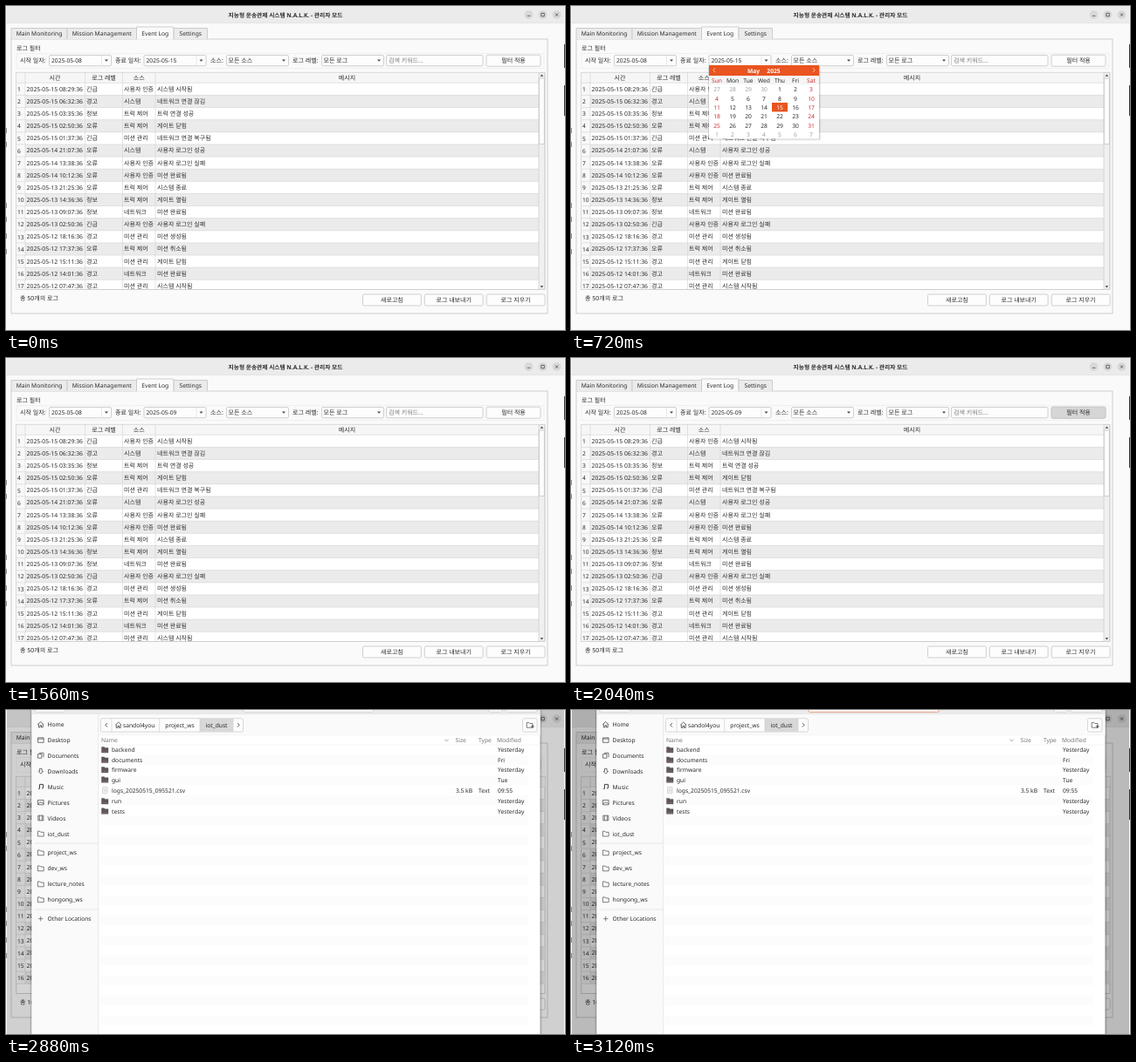
These frames come from a looping animation (640x372 px, 3240 ms). An HTML page:

```html
<!DOCTYPE html>
<html lang="ko">
<head>
<meta charset="utf-8">
<title>Event log</title>
<style>
html, body { margin: 0; width: 100%; height: 100%; overflow: hidden; background: #fafafa; }
svg { display: block; width: 640px; height: 372px; }
text { font-family: "Noto Sans", "Noto Sans CJK KR", "Noto Sans CJK JP", "Noto Sans CJK", sans-serif; text-rendering: geometricPrecision; white-space: pre; }
</style>
</head>
<body>
<svg id="stage" viewBox="0 0 640 372" xmlns="http://www.w3.org/2000/svg"></svg>
<script>
const LOOP = 3240;
const INK = '#2b2b2b', EDGE = '#c4c4c4', ORANGE = '#e95420', RED = '#cf2f35';
const KO = 7, EN = 6.7;

// y is the vertical middle of the text
const text = (x, y, s, o = {}) => {
  const size = o.size || (/[가-힣]/.test(s) ? KO : EN);
  return `<text x="${x}" y="${y + 2.5}" font-size="${size}" fill="${o.fill || INK}"` +
    ` text-anchor="${o.anchor || 'start'}" font-weight="${o.weight || 400}">${s}</text>`;
};
const mid = (x, y, s, o = {}) => text(x, y, s, { ...o, anchor: 'middle' });
const box = (x, y, w, h, fill, stroke = 'none', r = 0, extra = '') =>
  `<rect x="${x}" y="${y}" width="${w}" height="${h}" fill="${fill}" stroke="${stroke}" stroke-width=".8" rx="${r}" ${extra}/>`;
const path = (d, stroke = '#555', w = .8, fill = 'none') =>
  `<path d="${d}" fill="${fill}" stroke="${stroke}" stroke-width="${w}"/>`;
const group = (id, body) => `<g id="${id}">${body}</g>`;
const button = (x, y, w, label, fill = '#fdfdfd') =>
  box(x, y, w, 13, fill, EDGE, 1.5) + mid(x + w / 2, y + 6.6, label);
const down = (x, y) => path(`M${x - 2} ${y - 1}h4l-2 2.4z`, 'none', 0, '#444');

function windowFrame() {
  let s = box(0, 0, 640, 372, '#fafafa') + box(1, 0, 638, 19.5, '#ebebeb') + path('M1 19.5H639', '#dedede', .6);
  s += mid(320, 10.2, '지능형 운송관제 시스템 N.A.L.K. - 관리자 모드', { size: 6.7, weight: 600 });
  for (const x of [598.5, 614.5, 630.5]) s += `<circle cx="${x}" cy="10" r="5" fill="#d9d9d9"/>`;
  s += path('M596.8 11.3h3.6M612.8 8.3h3.5v3.5h-3.5zM628.9 8.4l3.3 3.3M632.2 8.4l-3.3 3.3', '#333', .7);
  for (const y of [140, 156, 226, 242, 261, 279]) s += box(0, y, .8, 6, '#777');
  for (const [y, h] of [[44, 27], [91, 35]]) s += box(639, y, 1, h, '#333');
  s += box(6, 38, 614, 315, '#fafafa', EDGE);
  const tabs = [[6, 64, 'Main Monitoring'], [70, 79.5, 'Mission Management'], [149.5, 42.5, 'Event Log'], [192, 38.5, 'Settings']];
  for (const [x, w, name] of tabs) {
    const on = name === 'Event Log';
    s += path(`M${x} 38V${on ? 24 : 25.5}h${w}V38`, EDGE, .8, on ? '#fafafa' : '#ebebeb');
    if (on) s += path(`M${x + .4} 38h${w - .8}`, '#fafafa', 1.2);
    s += mid(x + w / 2, 31, name);
  }
  return s;
}

function filterBar() {
  let s = text(12, 48.2, '로그 필터') + box(12, 54.5, 604, 17, 'none', '#eeeeee');
  const labels = [[16, '시작 일자:'], [125, '종료 일자:'], [234, '소스:'], [328, '로그 레벨:']];
  for (const [x, label] of labels) s += text(x, 62.2, label);
  for (const x of [49.5, 158, 252.5, 361.5]) s += box(x, 56.5, 71, 12.3, '#fdfdfd', EDGE, 1.5) + down(x + 65.5, 62.4);
  for (const x of [109.5, 218]) s += path(`M${x} 57v11.5`, '#dcdcdc', .6);
  s += text(52, 62.7, '2025-05-08') + text(254.5, 62.7, '모든 소스') + text(363.5, 62.7, '모든 로그');
  s += box(435.5, 56.5, 110.5, 12.3, '#fdfdfd', EDGE, 1.5) + text(438, 62.7, '검색 키워드...', { fill: '#777' });
  s += group('endDate', '') + group('caret', path('M160.3 58.5v8.5', '#222', .7));
  s += button(550, 56.2, 62, '필터 적용') + group('pressed', button(550, 56.2, 62, '필터 적용', '#d6d6d6'));
  return s;
}

const LEVELS = ['긴급', '경고', '정보', '오류'];
const SOURCES = ['사용자 인증', '시스템', '트럭 제어', '미션 관리', '네트워크'];
// day, time, level, source, message
const ALL = `15 08:29 0 0 시스템 시작됨
15 06:32 1 1 네트워크 연결 끊김
15 03:35 2 2 트럭 연결 성공
15 02:50 3 2 게이트 닫힘
15 01:37 0 3 네트워크 연결 복구됨
14 21:07 3 1 사용자 로그인 성공
14 13:38 3 0 사용자 로그인 실패
14 10:12 3 0 미션 완료됨
13 21:25 3 2 시스템 종료
13 14:36 2 2 게이트 열림
13 09:07 2 4 미션 완료됨
13 02:50 0 0 사용자 로그인 실패
12 18:16 1 3 미션 생성됨
12 17:37 3 2 미션 취소됨
12 15:11 1 3 게이트 닫힘
12 14:01 1 4 미션 완료됨
12 07:47 1 3 시스템 시작됨`;
const FILTERED = `09 12:13 0 4 미션 완료됨
09 10:57 1 2 사용자 로그인 실패
09 06:19 1 0 네트워크 연결 끊김
09 05:22 0 2 시스템 시작됨
09 04:53 3 1 미션 완료됨
09 04:29 2 3 사용자 로그인 성공
08 22:51 0 4 미션 완료됨
08 22:35 1 1 미션 생성됨
08 18:51 1 1 배터리 부족 경고
08 17:01 2 4 네트워크 연결 끊김
08 15:37 2 0 시스템 종료
08 15:19 1 3 게이트 열림
08 12:38 1 2 네트워크 연결 끊김
08 11:02 3 4 트럭 연결 성공
08 10:42 3 3 시스템 시작됨
08 10:10 3 1 미션 생성됨`;

function table(data, total, scrolls) {
  const right = scrolls ? 610 : 617, top = 88.3, step = 14.125;
  const rows = data.split('\n');
  const end = Math.min(325.5, top + rows.length * step);
  let s = box(11.8, 76.3, 605.2, 249.2, '#fff', EDGE) + box(12.2, 76.7, right - 12.2, 11.6, '#f6f6f6');
  let body = '', lines = `M12 ${top}H${right}`;
  rows.forEach((row, i) => {
    const [day, time, level, source, ...message] = row.split(' ');
    const y = top + i * step, c = y + 7;
    if (i % 2) body += box(22, y, right - 22, step, '#ebebeb');
    body += box(12.2, y, 9.8, step, '#f8f8f8');
    lines += `M12 ${y + step}H${right}`;
    body += text(13, c + .3, i + 1) + text(23.6, c, `2025-05-${day} ${time}:36`, { size: 6.82 });
    body += text(92, c, LEVELS[level]) + text(135, c, SOURCES[source]) + text(173, c, message.join(' '));
  });
  for (const x of [22, 90.5, 133.5, 171]) lines += `M${x} 76.5V${end}`;
  s += `<g clip-path="url(#tableClip)">${body}${path(lines, '#d2d2d2', .6)}</g>`;
  [[56, '시간'], [112, '로그 레벨'], [152.3, '소스'], [(171 + right) / 2, '메시지']]
    .forEach(([x, name]) => s += mid(x, 82.7, name));
  if (scrolls) {
    s += box(610, 76.7, 6.6, 248.4, '#f0f0f0', '#d0d0d0') + box(610.3, 83, 6, 75.5, '#fcfcfc', EDGE);
    s += path('M611.6 80.8h3.6l-1.8-2.2zM611.6 321.2h3.6l-1.8 2.2z', 'none', 0, '#444');
  }
  return s + text(16, 335.6, `총 ${total}개의 로그`);
}

function calendar() {
  const colX = i => 167 + 18 * i, rowY = i => 95.7 + 10.33 * i;
  let s = box(157, 69, 129, 85.5, '#000', 'none', 2, 'opacity=".08"') + box(157.5, 68.5, 127.5, 84.8, '#000', 'none', 1, 'opacity=".12"');
  s += box(158, 68, 126, 84.5, '#fff') + box(158, 68, 126, 12, ORANGE) + box(158, 80, 126, 10.2, '#f5f5f5');
  s += mid(209, 74.1, 'May', { fill: '#fff', weight: 700 }) + mid(232, 74.1, '2025', { fill: '#fff', weight: 700 });
  s += path('M165 71.3l-2.2 2.4 2.2 2.4M277 71.3l2.2 2.4-2.2 2.4', '#ffd0a8', .9);
  ['Sun', 'Mon', 'Tue', 'Wed', 'Thu', 'Fri', 'Sat'].forEach((d, i) =>
    s += mid(colX(i), 85.2, d, { fill: i % 6 ? INK : RED }));
  s += box(230, 111, 18, 10.4, ORANGE);
  s += group('hover', box(248.2, 100.6, 17.4, 10, '#fdf4ee', '#e6c8b2'));
  for (let i = 0; i < 42; i++) {
    const day = i - 3, col = i % 7;
    const label = day < 1 ? day + 30 : day > 31 ? day - 31 : day;
    const fill = day < 1 || day > 31 ? '#a0a0a0' : day === 15 ? '#fff' : col % 6 ? INK : RED;
    s += mid(colX(col), rowY(Math.floor(i / 7)), label, { fill });
  }
  return s;
}

const folderIcon = (x, y) => path(`M${x} ${y - 2.8}h2.5l1 1.1h3.3v4.7h-6.8z`, '#555', .75);
const homeIcon = (x, y) => path(`M${x} ${y}l3.4-3.2 3.4 3.2M${x + 1} ${y - .6}v3.8h1.7v-2.2h1.5v2.2h1.7v-3.8`, '#444', .8);
const sideIcons = {
  Home: y => homeIcon(36.3, y),
  Desktop: y => path(`M36.5 ${y - 2.7}h6.6v5.4h-6.6zM36.5 ${y - 1.5}h6.6`),
  Documents: y => path(`M36.5 ${y - 1.8}h4.4v4.6h-4.4zM38 ${y - 3.1}h5v4.9`),
  Downloads: y => path(`M38.5 ${y - 3}h2.6v3h1.4l-2.7 3-2.7-3h1.4z`),
  Music: y => path(`M38.5 ${y + 2}v-4.8h4v4.2M37 ${y + 2.2}h1.5M41 ${y + 1.7}h1.5`, '#444', 1),
  Pictures: y => path(`M36.5 ${y - 2.7}h6.6v5.4h-6.6zM37 ${y + 2}l2-2.5 1.5 1.4 1-1 1.5 2`),
  Videos: y => path(`M36.8 ${y - 2.8}h6v5.6h-6zM38.3 ${y - 2.8}v5.6M41.3 ${y - 2.8}v5.6`)
};

function fileDialog() {
  let s = box(27.5, 0, 586, 372, '#000', 'none', 0, 'opacity=".1"') + box(28.5, 0, 584, 372, '#000', 'none', 0, 'opacity=".16"');
  s += box(29.5, 0, 582, 372, '#fff') + box(29.5, 0, 76, 372, '#fafafa') + box(106, 4, 505.5, 24.5, '#fafafa');
  s += box(29.5, 0, 582, 4.2, '#ebebeb') + path('M29.5 4.4H611.5M105.7 4.4V372', '#dadada', .6);
  for (const [x, w] of [[33, 35], [272, 149], [553, 15], [572, 36]]) s += box(x, -5, w, 7.3, '#fcfcfc', '#cfcfcf', 1.5);
  s += group('focus', box(272, -5, 149, 7.3, '#fff', '#ea8a68', 1.5));

  const places = [['Home', 16.7], ['Desktop', 34.6], ['Documents', 52.4], ['Downloads', 70.3], ['Music', 88.2],
    ['Pictures', 106.1], ['Videos', 124], ['iot_dust', 142], ['project_ws', 163.8], ['dev_ws', 181.8],
    ['lecture_notes', 199.8], ['hongong_ws', 217.7]];
  for (const [name, y] of places) s += (sideIcons[name] || (v => folderIcon(36.4, v)))(y) + text(47.5, y, name);
  s += path('M37 239.7h5.4M39.7 237v5.4', '#555', .7) + text(47.5, 239.7, 'Other Locations');
  s += path('M33 153H105M33 229H105', '#dddddd', .7);

  s += box(108.5, 9.7, 163, 15.4, '#fcfcfc', '#cecece', 2) + box(222, 10, 38, 14.8, '#d8d8d8');
  s += path('M121 10v15M175.7 10v15M222 10v15M260 10v15', '#d2d2d2', .7);
  s += path('M115.9 15.1l-2.1 2.2 2.1 2.2M265 15.1l2.1 2.2-2.1 2.2', '#444', .9);
  s += homeIcon(125.3, 17.2) + text(134, 17.2, 'sandol4you') + mid(199, 17.2, 'project_ws') + mid(241, 17.2, 'iot_dust');
  s += box(591.5, 9.7, 16.5, 15.4, '#fcfcfc', '#cecece', 2) + folderIcon(596.2, 17.2) + path('M600.8 19h4M602.8 17v4', '#444', .8);

  const head = { fill: '#777', weight: 500 };
  for (const [x, name] of [[109, 'Name'], [514.5, 'Size'], [541, 'Type'], [562, 'Modified']]) s += text(x, 34.2, name, head);
  s += path('M502.6 33.7l2 2 2-2', '#777', .7) + path('M106 28.7H611.5M106 40H611.5', '#efefef', .6);
  for (let y = 51.7; y < 372; y += 23) s += box(106, y, 492, 11.5, '#fcfcfc');
  const files = [['backend', 45.8, 'Yesterday'], ['documents', 57.2, 'Fri'], ['firmware', 68.7, 'Yesterday'], ['gui', 80, 'Tue'],
    ['logs_20250515_095521.csv', 92.2, '09:55'], ['run', 104.7, 'Yesterday'], ['tests', 116.1, 'Yesterday']];
  for (const [name, y, when] of files) {
    if (name.endsWith('.csv')) {
      s += box(110.6, y - 3.7, 5.4, 7.2, '#f5f5f5', '#c9c9c9', .6) + path(`M111.8 ${y - 1}h3M111.8 ${y + .8}h3`, '#aaa', .5);
      s += text(534, y, '3.5 kB', { anchor: 'end' }) + text(541, y, 'Text');
    } else {
      s += path(`M109.5 ${y - 3.3}h3l.8 1h3.7v5.5h-7.5z`, '#4a4548', .4, '#5d565a') + box(109.7, y + 1.2, 7.1, 1.7, '#756169');
    }
    s += text(121, y, name) + text(563, y, when);
  }
  return s;
}

const stage = document.getElementById('stage');
stage.innerHTML = '<clipPath id="tableClip"><rect x="11.5" y="76" width="606" height="249.3"/></clipPath>' +
  windowFrame() + filterBar() +
  group('allLogs', table(ALL, 50, true)) + group('fewLogs', table(FILTERED, 16, false)) +
  button(408.5, 331, 66.8, '새로고침') + button(479.3, 331, 66.8, '로그 내보내기') + button(550.2, 331, 66.8, '로그 지우기') +
  group('calendar', calendar()) +
  group('dim', box(1, 0, 638, 372, '#000')) + group('dialog', fileDialog());

const part = id => document.getElementById(id);
const endDate = part('endDate');
endDate.innerHTML = text(160.5, 62.7, '2025-05-15');
const endText = endDate.firstChild;
const parts = Object.fromEntries(
  ['caret', 'pressed', 'allLogs', 'fewLogs', 'calendar', 'hover', 'dim', 'dialog', 'focus'].map(id => [id, part(id)]));
const show = (id, on) => parts[id].setAttribute('display', on ? 'inline' : 'none');

function draw(t) {
  const within = (a, b) => t >= a && t < b;
  show('calendar', within(240, 1200));
  show('hover', within(960, 1200));
  endText.textContent = t < 1200 ? '2025-05-15' : '2025-05-09';
  show('caret', within(1200, 1560));
  show('pressed', within(1920, 2160));
  show('allLogs', t < 2160);
  show('fewLogs', t >= 2160);
  show('dim', t >= 2880);
  show('dialog', t >= 2880);
  const fade = Math.min(2, Math.floor((t - 2880) / 120));
  parts.dim.setAttribute('opacity', .17 + .045 * fade);
  parts.focus.setAttribute('opacity', Math.max(0, fade / 2));
}

function tick() {
  draw(performance.now() % LOOP);
  requestAnimationFrame(tick);
}
tick();
</script>
</body>
</html>
```
